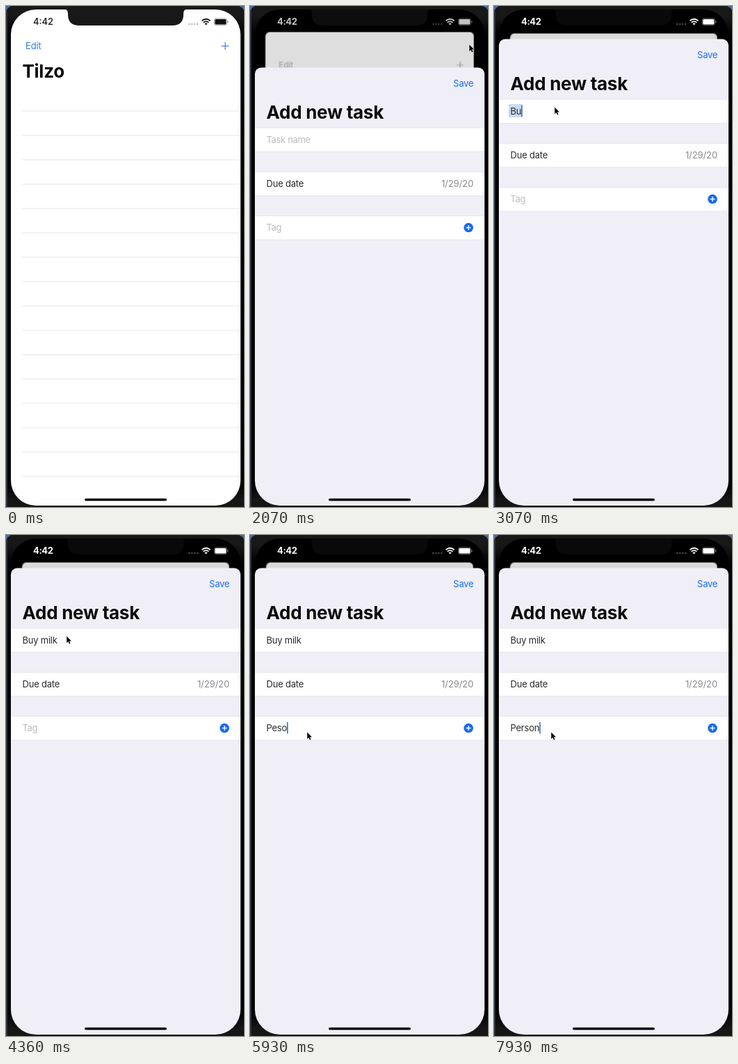
An HTML page for the animation above (8 s loop, 342 px wide and 720 px high).

```html
<!DOCTYPE html>
<html lang="en">
<head>
<meta charset="utf-8">
<title>Task list</title>
<style>
html, body { margin: 0; width: 100%; height: 100%; overflow: hidden; background: #000; }
svg { display: block; width: 342px; height: 720px; font: 13px Inter, sans-serif; letter-spacing: -.22px; }
text { white-space: pre; }
.title { font-size: 26px; font-weight: 700; letter-spacing: -.27px; fill: #0b0b0c; }
.end { text-anchor: end; }
.link { fill: #1a6fee; letter-spacing: -.3px; }
.hint { fill: #bcbcc0; letter-spacing: -.35px; }
.ink { fill: #2a2a2c; }

#card, #dim, #nav, #plus, #bar, #clock, #notch, #sheet, #pointer {
  animation: 8s step-end infinite;
}
#card { animation-name: card; }
#dim { animation-name: dim; }
#nav { animation-name: nav; }
#plus { animation-name: plus; }
#bar { animation-name: bar; }
#clock { animation-name: clock; }
#notch { animation-name: notch; }
#sheet { animation-name: sheet; }
#pointer { animation-name: pointer; }

@keyframes card {
  0% { transform: none; }
  25.875% { transform: translate(15.65px, 32.5px) scale(.909); }
  27.625%, 100% { transform: translate(16.68px, 34.5px) scale(.903); }
}
@keyframes dim {
  0% { opacity: 0; }
  25.875% { opacity: .13; }
  27.625%, 100% { opacity: .15; }
}
@keyframes nav {
  0% { color: #2c7be0; }
  25.875%, 100% { color: #96969a; }
}
@keyframes plus {
  0% { opacity: 1; }
  24.125% { opacity: .4; }
  25.875%, 100% { opacity: 1; }
}
@keyframes bar {
  0% { color: #111; }
  25.875% { color: #c4c4c4; }
  27.625%, 100% { color: #fff; }
}
@keyframes clock {
  0% { font-weight: 500; letter-spacing: 0; }
  25.875%, 100% { font-weight: 700; letter-spacing: -.4px; }
}
@keyframes notch {
  0% { fill: #181818; }
  25.875% { fill: #0d0d0d; }
  27.625%, 100% { fill: #090909; }
}
@keyframes sheet {
  0% { transform: translateY(700px); }
  25.875% { transform: translateY(41px); }
  27.625% { transform: translateY(9px); }
  29.5% { transform: translateY(2px); }
  31.25%, 100% { transform: none; }
}
@keyframes pointer {
  0% { transform: translate(266px, 232px); opacity: 0; }
  6.25% { transform: translate(266px, 232px); opacity: 1; }
  8% { transform: translate(266px, 232px); opacity: 0; }
  11.625% { transform: translate(277px, 60px); opacity: 1; }
  13.375% { transform: translate(292px, 57px); }
  15.125% { transform: translate(304px, 54px); }
  17% { transform: translate(311px, 54px); }
  18.75% { transform: translate(315px, 55px); }
  27.625% { transform: translate(306px, 60px); }
  29.5% { transform: translate(252px, 85px); }
  31.25% { transform: translate(168px, 119px); }
  33% { transform: translate(108px, 139px); }
  34.875% { transform: translate(87px, 145px); }
  56.25% { transform: translate(88px, 162px); }
  58% { transform: translate(89px, 215px); }
  59.875% { transform: translate(85px, 264px); }
  61.625%, 100% { transform: translate(82px, 283px); opacity: 1; }
}
</style>
</head>
<body>
<svg viewBox="0 0 342 720">
  <defs>
    <clipPath id="screen"><rect x="7" y="5" width="330" height="713" rx="36"/></clipPath>
    <clipPath id="page"><rect x="7" y="5" width="330" height="713" rx="8"/></clipPath>
    <linearGradient id="bezel" x2="0" y2="1">
      <stop offset=".02" stop-color="#181818"/>
      <stop offset=".06" stop-color="#000"/>
      <stop offset=".95" stop-color="#000"/>
      <stop offset=".985" stop-color="#161616"/>
    </linearGradient>
  </defs>

  <rect width="342" height="720" fill="url(#bezel)"/>
  <rect width="2" height="720" fill="#2c313c"/>
  <path d="M0 0H7Q3 2 0 7ZM342 0H335Q339 2 342 6Z" fill="#4c66a6"/>

  <g clip-path="url(#screen)">
    <rect x="7" y="5" width="330" height="713" fill="#000"/>
    <g id="card"><g clip-path="url(#page)">
      <rect x="7" y="5" width="330" height="713" fill="#fff"/>
      <path id="rules" stroke="#e6e6e6"/>
      <text class="title" x="23.5" y="103">Tilzo</text>
      <rect id="dim" x="7" y="5" width="330" height="713"/>
      <g id="nav">
        <text x="28" y="62" fill="currentColor" style="letter-spacing:-.1px">Edit</text>
        <path id="plus" d="M309.5 57.5h11M315 52v11" stroke="currentColor" stroke-width="1.2"/>
      </g>
    </g></g>

    <path id="notch" d="M83 4H261Q255 5 255 11V12Q255 28 239 28H105Q89 28 89 12V11Q89 5 83 4Z"/>

    <g id="bar" fill="currentColor">
      <text id="clock" x="39" y="27.3">4:42</text>
      <path d="M262 26h15" stroke="currentColor" stroke-width="2.2" stroke-dasharray="2.4 1.6" opacity=".28"/>
      <g fill="none" stroke="currentColor" stroke-width="1.8">
        <path d="M281.5 21.3Q287.5 16.2 293.5 21.3M283.7 23.7Q287.5 20.5 291.3 23.7"/>
      </g>
      <path d="M285.4 25.2Q287.5 23.7 289.6 25.2L287.5 27.4Z"/>
      <rect x="299.3" y="18" width="18" height="9.4" rx="2.6" fill="none" stroke="currentColor" stroke-width=".8" opacity=".5"/>
      <rect x="300.3" y="19" width="16" height="7.4" rx="1.5"/>
      <rect x="318.3" y="21.2" width="1.1" height="3" rx=".5" opacity=".5"/>
    </g>

    <g id="sheet">
      <rect x="7" y="47.5" width="330" height="700" rx="9" fill="#f0eff7"/>
      <text class="link end" x="321" y="75.3">Save</text>
      <text class="title" x="23.5" y="120.5">Add new task</text>
      <g fill="#fff" stroke="#e3e2e9" stroke-width=".8">
        <rect x="6" y="134" width="332" height="34.5"/>
        <rect x="6" y="197.3" width="332" height="34.5"/>
        <rect x="6" y="260.5" width="332" height="34.5"/>
      </g>
      <text class="ink" x="23.5" y="219.3">Due date</text>
      <text class="end" x="321" y="219.3" fill="#8a8a8e" style="letter-spacing:-.1px">1/29/20</text>
      <circle cx="314" cy="277.5" r="6.8" fill="#1769f2"/>
      <path d="M310.6 277.5h6.8M314 274.1v6.8" stroke="#fff" stroke-width="1.4"/>
      <g id="name" transform="translate(23.5 155.5)">
        <rect class="mark" x="-2.5" y="-14.5" height="19" fill="#c8dbf6"/>
        <text></text>
        <rect class="caret" y="-13" width="1.5" height="16.5" fill="#2a62d4"/>
      </g>
      <g id="tag" transform="translate(23.5 282)">
        <rect class="mark" x="-2.5" y="-14.5" height="19" fill="#c8dbf6"/>
        <text></text>
        <rect class="caret" y="-13" width="1.5" height="16.5" fill="#2a62d4"/>
      </g>
    </g>
    <rect x="113" y="707.7" width="118" height="3.6" rx="1.8" fill="#050505"/>
  </g>

  <path id="pointer" d="M.2 .4V10.2L2.4 8.1 3.9 11.6 5.5 10.9 4 7.6H7Z" fill="#0a0a0a" stroke="#fff" stroke-width=".8" paint-order="stroke"/>
</svg>
<script>
const LOOP = 8000;

// Each step: [ms, text, caret shown, text marked]
const fields = [
  {
    id: "name", hint: "Task name",
    steps: [
      [0, "", 0, 0], [2930, "", 1, 0], [3070, "Bu", 1, 1], [3210, "Buy", 1, 0],
      [3360, "Buy ", 1, 0], [3640, "Buy m", 1, 0], [3790, "Buy mi", 1, 0],
      [3930, "Buy mil", 1, 0], [4070, "Buy milk", 1, 0], [4360, "Buy milk", 0, 0]
    ]
  },
  {
    id: "tag", hint: "Tag",
    steps: [
      [0, "", 0, 0], [5070, "", 1, 0], [5500, "P", 1, 0], [5640, "Pe", 1, 1],
      [5790, "Pes", 1, 0], [5930, "Peso", 1, 0], [6070, "Peson", 1, 0],
      [6360, "Pesona", 1, 0], [6500, "Pesonal", 1, 0], [6640, "Pesona", 1, 0],
      [6790, "Peso", 1, 0], [6930, "Pes", 1, 0], [7070, "Pe", 1, 1], [7220, "P", 1, 0],
      [7500, "Pe", 1, 0], [7640, "Per", 1, 0], [7790, "Perso", 1, 0], [7930, "Person", 1, 0]
    ]
  }
];

for (const field of fields) {
  const box = document.getElementById(field.id);
  field.label = box.querySelector("text");
  field.caret = box.querySelector(".caret");
  field.mark = box.querySelector(".mark");
}

document.getElementById("rules").setAttribute("d",
  Array.from({ length: 16 }, (_, i) => `M23.5 ${151 + 35 * i}H337`).join(""));

function drawField({ label, caret, mark, hint, steps }, time) {
  const [, text, hasCaret, marked] = steps.findLast(step => step[0] <= time);
  label.textContent = text || hint;
  label.setAttribute("class", text ? "ink" : "hint");
  const width = text ? label.getComputedTextLength() : 0;
  caret.setAttribute("x", width);
  caret.style.opacity = hasCaret;
  mark.setAttribute("width", width + 4);
  mark.style.opacity = marked;
}

let start;
function draw(now) {
  start ??= now;
  const time = (now - start) % LOOP;
  for (const field of fields) drawField(field, time);
  requestAnimationFrame(draw);
}
requestAnimationFrame(draw);
</script>
</body>
</html>
```
